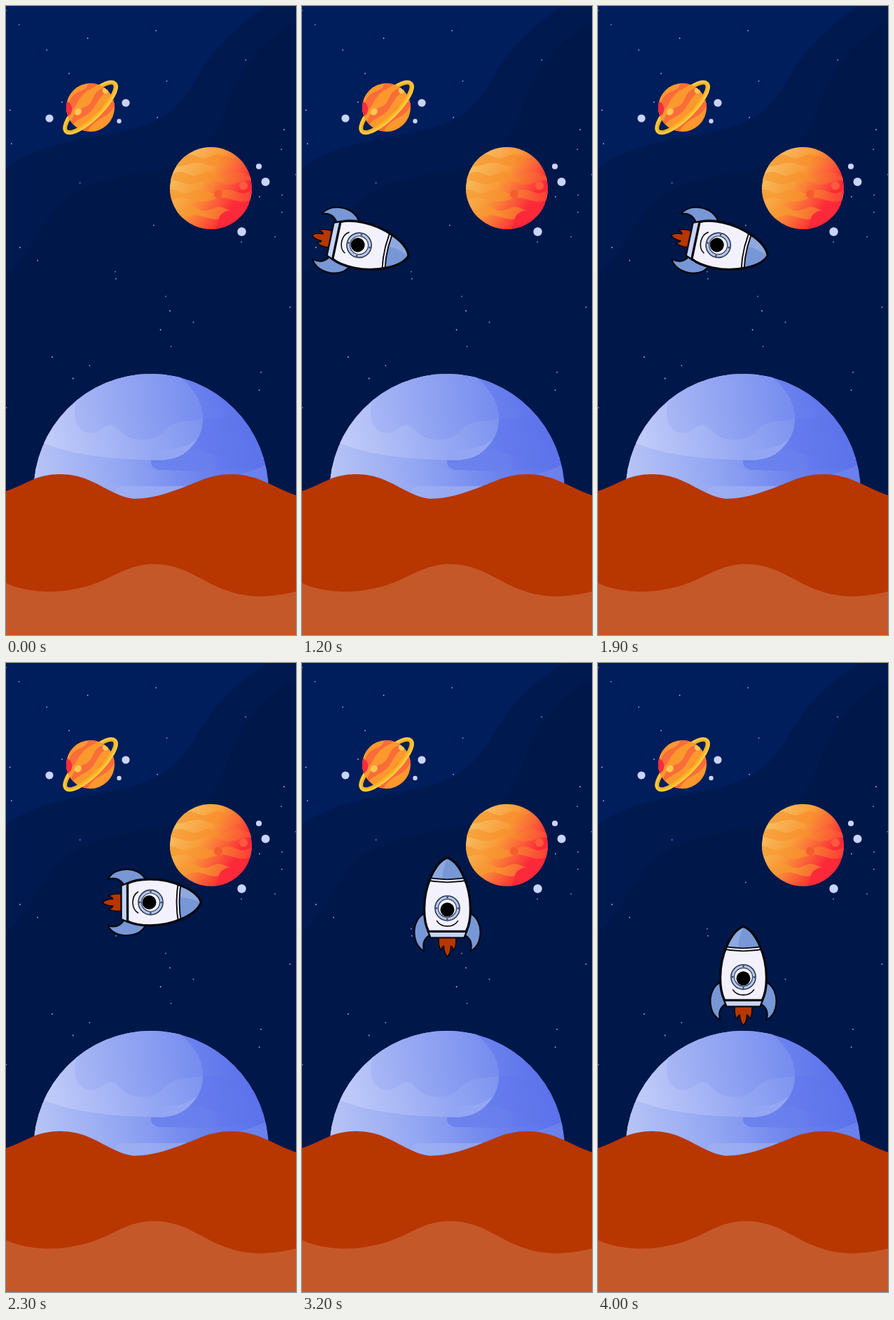
An HTML page that plays this animation: 414x896 px, repeating every 4.1 s.

```html
<!DOCTYPE html>
<html lang="en">
<head>
<meta charset="utf-8">
<title>Rocket landing</title>
<style>
html, body { margin: 0; width: 100%; height: 100%; overflow: hidden; background: #00174a; }
svg { display: block; width: 414px; height: 896px; }
.ink { stroke: #080a12; stroke-linejoin: round; stroke-linecap: round; }
.rim { stroke: #2c3954; }
</style>
</head>
<body>
<svg viewBox="0 0 414 896">
<defs>
  <linearGradient id="base" x1="0" x2="1" y1=".6" y2=".4">
    <stop offset="0" stop-color="#bcc8f7"/><stop offset=".43" stop-color="#8fa3f2"/>
    <stop offset=".72" stop-color="#6c83ee"/><stop offset="1" stop-color="#5a70ea"/>
  </linearGradient>
  <linearGradient id="light" gradientUnits="userSpaceOnUse" x1="50" y1="625" x2="282" y2="580">
    <stop offset="0" stop-color="#c3cef9"/><stop offset="1" stop-color="#7d93f0"/>
  </linearGradient>
  <linearGradient id="blob" gradientUnits="userSpaceOnUse" x1="97" y1="600" x2="282" y2="570">
    <stop offset="0" stop-color="#a9b8f5"/><stop offset="1" stop-color="#758cef"/>
  </linearGradient>
  <linearGradient id="fire" x1=".05" y1=".2" x2=".9" y2=".75">
    <stop offset="0" stop-color="#f7c265"/><stop offset=".42" stop-color="#f99b38"/>
    <stop offset=".66" stop-color="#fb6338"/><stop offset=".88" stop-color="#fb2939"/>
  </linearGradient>
  <linearGradient id="band" gradientUnits="userSpaceOnUse" x1="234" y1="240" x2="350" y2="275">
    <stop offset="0" stop-color="#f7a63f"/><stop offset=".5" stop-color="#f8902f"/>
    <stop offset="1" stop-color="#fb3c39"/>
  </linearGradient>
  <clipPath id="blueClip"><circle cx="207" cy="692" r="168"/></clipPath>
  <clipPath id="fireClip"><circle cx="292.5" cy="259.5" r="58.5"/></clipPath>
  <clipPath id="goldClip"><circle r="34.5"/></clipPath>
  <path id="hull" d="M0-71C-18-65-33-30-33 2C-33 15-31 26-27 34H27C31 26 33 15 33 2C33-30 18-65 0-71Z"/>
  <clipPath id="hullClip"><use href="#hull"/></clipPath>
</defs>

<rect width="414" height="896" fill="#00174a"/>
<path fill="#001a50" d="M0 0H414V25C385 33 350 68 331 105C314 142 304 182 272 211C235 244 155 232 97 267C52 295 38 350 0 385Z"/>
<path fill="#001d5c" d="M0 0H372C330 28 300 58 278 92C260 122 246 148 212 164C155 190 60 185 0 231Z"/>
<g id="stars" fill="#c3d0f2"></g>

<!-- ringed planet -->
<g transform="translate(120.5 144.5) rotate(-44.5)">
  <g fill="none">
    <ellipse rx="48.5" ry="15" stroke="#f9b51f" stroke-width="6"/>
    <ellipse rx="50" ry="16.5" stroke="#f8ca4c" stroke-width="2.5"/>
  </g>
  <circle r="34.5" fill="#fb982e"/>
  <g clip-path="url(#goldClip)">
    <g id="goldBands" fill="#f96d38"></g>
    <circle cx="-29" cy="-25" r="12" fill="#fb2b3d"/>
    <ellipse cx="-17" cy="-8" rx="5.5" ry="4.5" fill="#fbc653"/>
    <ellipse cx="32" cy="-2" rx="4" ry="4.5" fill="#fbc653"/>
  </g>
  <g fill="none">
    <path d="M-48.5 0A48.5 15 0 0 0 48.5 0" stroke="#f9b51f" stroke-width="6"/>
    <path d="M-50 0A50 16.5 0 0 0 50 0" stroke="#f8ca4c" stroke-width="2.5"/>
  </g>
</g>

<!-- red planet -->
<circle cx="292.5" cy="259.5" r="58.5" fill="url(#fire)"/>
<g clip-path="url(#fireClip)">
  <g id="fireBands" fill="url(#band)"></g>
  <path fill="#fb2939" d="M298 319C306 311 300 300 311 294C322 287 331 298 350 278V319Z"/>
  <circle cx="303" cy="268" r="6" fill="#f45d2e"/>
  <circle cx="339" cy="256" r="6" fill="#fc5a3e"/>
</g>
<g fill="#c8d5f9">
  <circle cx="62" cy="160" r="5.6"/><circle cx="171" cy="138" r="5.6"/><circle cx="161.5" cy="164" r="3.2"/>
  <circle cx="361" cy="228.5" r="4.1"/><circle cx="370.5" cy="250.5" r="6"/><circle cx="336.5" cy="321.5" r="6.2"/>
</g>

<!-- blue planet -->
<g clip-path="url(#blueClip)">
  <circle cx="207" cy="692" r="168" fill="url(#base)"/>
  <path fill="#5d73eb" opacity=".45" d="M278 590C310 588 340 582 375 568V652C330 664 270 662 222 661C204 660 204 645 212 642C250 640 276 620 278 590Z"/>
  <path fill="url(#light)" d="M40 617C90 640 150 646 215 647C255 645 281 622 281 588C281 560 262 538 238 520H40Z"/>
  <path fill="url(#blob)" d="M128 530C105 548 98 563 98 580C98 597 107 608 121 608C136 608 137 597 149 597C163 598 165 618 195 618C229 617 222 595 253 592Q270 591 281 588C281 560 262 538 238 520H140Z"/>
  <path fill="#93a6f3" d="M207 646C206 636 211 632 222 632C240 632 258 629 272 617C262 637 244 646 222 647Z"/>
  <path fill="#6a81ee" opacity=".65" d="M207 647H228C244 645 258 639 268 630L300 640V661H222C211 661 207 655 207 647Z"/>
  <path fill="#a3b4f5" opacity=".6" d="M155 692C157 686 162 684 170 684H245C275 684 300 681 320 676V710H155Z"/>
  <path fill="#8196f0" opacity=".4" d="M330 668Q355 662 376 651V690H330Z"/>
</g>

<path fill="#b83600" d="M0 691C20 684 30 678 42 673C56 668 66 667 79 667C112 667 134 684 154 693Q170 701 183 702C214 702 242 690 270 679C290 670 306 667 322 667C360 667 382 686 414 697V896H0Z"/>
<path fill="#c55829" d="M0 822C28 835 64 837 95 831C148 823 166 795 211 795C272 795 292 842 368 841Q395 839 414 834V896H0Z"/>

<g id="rocket">
  <path class="ink" stroke-width="1.6" fill="#b83600" d="M-12 41C-13 50-12 57-9 61C-8 57-7 55-5 55C-5 62-3 67 0 70C3 67 5 62 5 55C7 55 8 57 9 61C12 57 13 50 12 41Z"/>
  <g class="ink" stroke-width="2.2" fill="#7797d6">
    <path id="fin" d="M-32 8C-43 13-48 26-47 38C-46 50-41 58-33 62C-36 52-33 44-25 39Z"/>
    <use href="#fin" transform="scale(-1 1)"/>
  </g>
  <path class="ink" stroke-width="2.4" fill="#c6d4f6" d="M-28 33L-24 43H24L28 33Z"/>
  <use href="#hull" fill="#f3f2fc"/>
  <g clip-path="url(#hullClip)">
    <path fill="#7797d6" d="M-40-45Q0-35 40-45V-80H-40Z"/>
    <path fill="#8ea9e0" d="M-40-45Q-20-40-7-40C-7-52-4-62 1-71H-40Z"/>
    <path class="ink" stroke-width="1.9" fill="none" d="M-40-45Q0-35 40-45M-40-41Q0-31 40-41"/>
  </g>
  <use href="#hull" class="ink" stroke-width="3.4" fill="none"/>
  <circle class="rim" cy="1" r="17.6" stroke-width="1.6" fill="#b5c6eb"/>
  <circle class="rim" cy="1" r="13" stroke-width="1.2" fill="#f3f2fc"/>
  <circle cy="3" r="10"/>
  <circle cy="1" r="15.3" class="rim" fill="none" stroke-width="2.4" stroke-linecap="round" pathLength="4" stroke-dasharray=".01 .99"/>
  <path class="ink" stroke-width="1.6" fill="none" d="M-15 19C-9 29 9 29 15 19"/>
</g>
</svg>
<script>
const LOOP = 4100, STEP = 100;
const $ = id => document.getElementById(id);

function add(parent, tag, attrs) {
  const el = document.createElementNS("http://www.w3.org/2000/svg", tag);
  for (const key in attrs) el.setAttribute(key, attrs[key]);
  parent.append(el);
}

// small seeded generator
let seed = 11;
const random = () => (seed = seed * 16807 % 2147483647) / 2147483647;

for (let i = 0; i < 48; i++) {
  add($("stars"), "circle", {
    cx: random() * 414, cy: (i + random()) * 14.3, r: 0.95, opacity: 0.6 + random() * 0.3
  });
}

// stripe with a rippled top and bottom edge
function stripe(parent, x, y, width, height, ripple, phase) {
  const top = [], bottom = [];
  for (let d = 0; d <= width; d += 3) {
    const wave = ripple * Math.sin(d / 6.5 + phase);
    top.push([x + d, y + wave]);
    bottom.unshift([x + d, y + height + ripple * Math.sin(d / 9 - phase)]);
  }
  add(parent, "path", { d: "M" + top.concat(bottom).join("L") + "Z" });
}

for (let i = 0; i < 4; i++) stripe($("fireBands"), 231, 214 + i * 25, 123, 12, 2.8, i * 2);
for (let i = 0; i < 3; i++) stripe($("goldBands"), -36, -27 + i * 20, 72, 9, 2.5, i * 2);

const ramp = (t, from, to) => Math.min(1, Math.max(0, (t - from) / (to - from)));

// fly in, turn upright, descend
function pose(t) {
  const x = -72 + 279.5 * ramp(t, 0, 2170);
  const angle = 102 * (1 - ramp(t, 2200, 3040));
  const y = 341 + 117.6 * ramp(t, 3140, LOOP);
  $("rocket").setAttribute("transform", `translate(${x} ${y}) rotate(${angle})`);
}

let start;
function draw(now) {
  start ??= now;
  pose(Math.floor((now - start) % LOOP / STEP) * STEP);
  requestAnimationFrame(draw);
}
pose(0);
requestAnimationFrame(draw);
</script>
</body>
</html>
```
